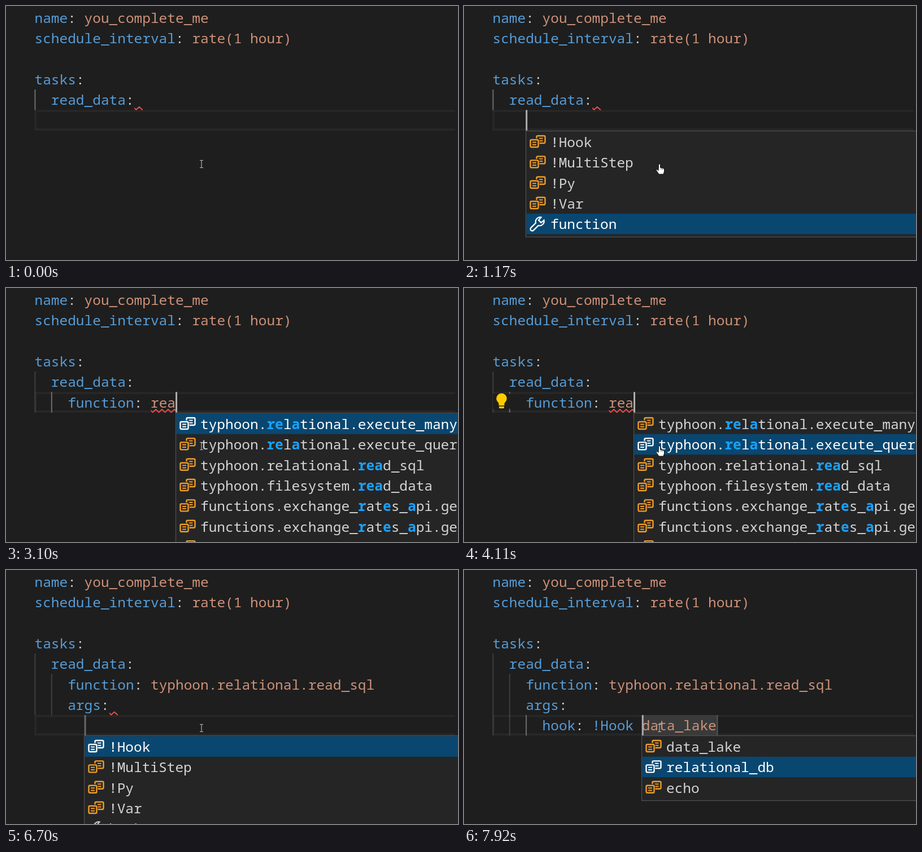
These frames come from a looping animation (800x450 px, 8000 ms). An HTML page with a canvas:

```html
<!DOCTYPE html>
<html lang="en">
<head>
<meta charset="utf-8">
<title>YAML completion</title>
<style>
html, body { margin: 0; width: 100%; height: 100%; overflow: hidden; background: #1e1e1e; }
canvas { display: block; }
</style>
</head>
<body>
<canvas id="stage" width="800" height="450"></canvas>
<script>
const ctx = document.getElementById('stage').getContext('2d');
const CHAR = 14.68, ROW = 36.35, LOOP = 8000, BASELINE = 27.3;
const FONT = '24.46px "Noto Sans Mono", "DejaVu Sans Mono", monospace';
const BLUE = '#569cd6', ORANGE = '#ce9178', GREY = '#d4d4d4', BG = '#1e1e1e', POPUP = '#252526';
const X = col => 51 + col * CHAR;
const Y = row => 2.5 + row * ROW;

const HEAD = ['name: you_complete_me', 'schedule_interval: rate(1 hour)', '', 'tasks:', '  read_data:'];
const READ = '    function: typhoon.relational.read_sql';

// "~" marks a property item, "*" encloses the matched letters
const KEYS = ['!Hook', '!MultiStep', '!Py', '!Var', '~function'];
const FUNCTIONS = [
  'typhoon.*re*l*a*tional.execute_many', 'typhoon.*re*l*a*tional.execute_query',
  'typhoon.relational.*rea*d_sql', 'typhoon.filesystem.*rea*d_data',
  'functions.exchange_*r*at*e*s_*a*pi.get', 'functions.exchange_*r*at*e*s_*a*pi.get_history',
  'typhoon.filesystem.*rea*d'
];
const ARGS = ['~*ar*gs', '!V*ar*'];
const VALUES = ['!Hook', '!MultiStep', '!Py', '!Var', '~hook', '~query'];
const HOOKS = ['data_lake', 'relational_db', 'echo'];

// Each step changes part of the editor state; guides are [column, first row, last row, active]
const STEPS = [
  [0, { lines: [], row: 5, col: 4, caret: 0, squiggle: [4, 12, 1], items: null, sel: 0,
        hand: false, bulb: false, selection: false, guides: [[0, 4, 4, 1]] }],
  [60, { caret: 1 }],
  [170, { items: KEYS }],
  [280, { hand: true }],
  [620, { sel: 1 }],
  [840, { sel: 2 }],
  [950, { sel: 3 }],
  [1170, { sel: 4 }],
  [1400, { lines: ['    function:'], col: 13, items: null, hand: false, guides: [[0, 4, 5], [2, 5, 5, 1]] }],
  [1510, { squiggle: null }],
  [1730, { squiggle: [5, 13, 1] }],
  [1840, { bulb: true }],
  [2180, { lines: ['    function: '], col: 14, bulb: false }],
  [2300, { squiggle: [5, 14, 1] }],
  [2640, { lines: ['    function: r'], col: 15 }],
  [2750, { lines: ['    function: re'], col: 16, squiggle: [5, 14, 2] }],
  [2970, { lines: ['    function: rea'], col: 17, squiggle: [5, 14, 3] }],
  [3080, { items: FUNCTIONS, sel: 0 }],
  [3190, { hand: true }],
  [3560, { bulb: true }],
  [4000, { sel: 1 }],
  [4220, { sel: 2 }],
  [4330, { lines: [READ], col: 41, items: null, hand: false, bulb: false }],
  [4450, { squiggle: null }],
  [4670, { row: 6, col: 4 }],
  [5110, { lines: [READ, '    a'], col: 5, guides: [[0, 4, 6], [2, 5, 6, 1]] }],
  [5330, { lines: [READ, '    ar'], col: 6 }],
  [5600, { squiggle: [6, 4, 2], items: ARGS, sel: 0 }],
  [5710, { hand: true }],
  [5930, { lines: [READ, '    args:'], row: 7, col: 6, items: null, hand: false, squiggle: null,
           guides: [[0, 4, 6], [2, 5, 6]] }],
  [6150, { squiggle: [6, 9, 1] }],
  [6260, { caret: 0 }],
  [6480, { caret: 1 }],
  [6590, { items: VALUES }],
  [6700, { caret: 0.5 }],
  [6810, { caret: 1, sel: 1 }],
  [6920, { sel: 2 }],
  [7030, { sel: 3 }],
  [7130, { sel: 4 }],
  [7360, { lines: [READ, '    args:', '      hook: !Hook data_lake'], col: 18, items: null, squiggle: null,
           selection: true, guides: [[0, 4, 7], [2, 5, 7], [4, 7, 7, 1]] }],
  [7470, { items: HOOKS, sel: 0 }],
  [7800, { sel: 1 }]
];

function rect(x, y, w, h, color) {
  ctx.fillStyle = color;
  ctx.fillRect(x, y, w, h);
}

function path(d, fill, stroke, width = 2) {
  const p = new Path2D(d);
  if (fill) { ctx.fillStyle = fill; ctx.fill(p); }
  if (stroke) { ctx.strokeStyle = stroke; ctx.lineWidth = width; ctx.stroke(p); }
}

function at(x, y, paint) {
  ctx.save();
  ctx.translate(x, y);
  paint();
  ctx.restore();
}

// Draws [text, color, bold] runs on the character grid
function runs(list, x, y) {
  for (const [text, color, bold] of list) {
    ctx.font = (bold ? 'bold ' : '') + FONT;
    ctx.fillStyle = color;
    ctx.fillText(text, x, y);
    x += text.length * CHAR;
  }
}

function codeLine(line, row) {
  const [, key, colon, tag, rest] = line.match(/^(?:(\s*\w+)(:))?(\s*!\w+)?(.*)$/);
  runs([[key || '', BLUE], [colon || '', GREY], [tag || '', BLUE], [rest, ORANGE]], X(0) - 0.5, Y(row) + BASELINE);
}

function squiggle([row, col, len]) {
  const x = X(col), y = Y(row + 1) - 3, w = len * CHAR, period = 10.9;
  ctx.save();
  ctx.beginPath();
  ctx.rect(x, y - 4, w, 8);
  ctx.clip();
  ctx.beginPath();
  for (let i = -1; i * period < w + period; i++) {
    ctx.lineTo(x + (i + 0.29) * period, y + 2.5);
    ctx.lineTo(x + (i + 0.79) * period, y - 2.5);
  }
  ctx.strokeStyle = '#f14c4c';
  ctx.lineWidth = 1.9;
  ctx.stroke();
  ctx.restore();
}

function enumIcon(color, back) {
  path('M14 -10.5h11q2 0 2 2v9q0 2 -2 2h-11q-2 0 -2 -2v-9q0 -2 2 -2z', null, color, 2.4);
  path('M16 -6h7M16 -1.8h7', null, color);
  rect(-1, -6, 18, 18, back);
  path('M3 -3.5h10q2 0 2 2v9q0 2 -2 2h-10q-2 0 -2 -2v-9q0 -2 2 -2z', null, color, 2.4);
  path('M4.5 1h7M4.5 5.2h7', null, color);
}

function wrenchIcon(color) {
  path('M20 -11.5a8 8 0 0 0 -9.5 10l-8.5 8.5a3 3 0 0 0 4.5 4.5l8.5 -8.5a8 8 0 0 0 10 -9.5l-5 4.5l-4.5 -4.5z', null, color, 2.2);
}

function popup({ row, col, items, sel }) {
  const x = Math.round(X(col)) - 0.5, y = Math.round(Y(row + 1)) + 0.5, h = items.length * ROW + 6;
  rect(x, y, 900, h, POPUP);
  items.forEach((item, i) => {
    const top = y + 1 + i * ROW, on = i === sel, back = on ? '#094771' : POPUP;
    if (on) rect(x + 1, top, 900, ROW, back);
    const property = item[0] === '~';
    at(x + 7, top + 18, () => property
      ? wrenchIcon(on ? '#fff' : '#c5c5c5')
      : enumIcon(on ? '#fff' : '#ee9d28', back));
    const parts = item.replace('~', '').split('*');
    runs(parts.map((s, k) => [s, k % 2 ? '#18a3ff' : on ? '#fff' : GREY, k % 2]), x + 43.5, top + BASELINE);
  });
  ctx.strokeStyle = '#505050';
  ctx.lineWidth = 1.2;
  ctx.strokeRect(x, y, 900, h);
}

function bulb(row) {
  rect(51, Y(row) + 3, 31, 27, BG);
  at(66.5, Y(row) + 12, () => {
    path('M-5 12V8C-7 5 -9.3 3 -9.3 -0.5A9.3 9.3 0 0 1 9.3 -0.5C9.3 3 7 5 5 8V12z', '#fc0');
    path('M-4.5 13.5h9v2q0 1.5 -2 1.5h-5q-2 0 -2 -1.5z', '#fc0');
  });
}

function mouse(hand) {
  at(346, 280, () => {
    if (hand) {
      path('M-1.5 1.5q0 -1.8 1.5 -1.8t1.5 1.8v5l5 1q2 .5 2 2.5v3l-1.5 5h-8l-4.5 -6.5q-1 -2 1 -2l2.5 2z', '#fff', '#111', 1);
      path('M2.8 10v-2M5.3 10.5v-2', null, '#333', 0.8);
    } else {
      path('M-3 -6.5h2.2l.8 .8l.8 -.8h2.2M0 -6V6M-3 6.5h2.2l.8 -.8l.8 .8h2.2', null, '#c0c0c0', 1.1);
    }
  });
}

function draw(t) {
  const s = {};
  for (const [time, change] of STEPS) if (time <= t) Object.assign(s, change);

  rect(0, 0, 800, 450, BG);
  const top = Y(s.row);
  rect(50.5, top, 744.5, 3.6, '#282828');
  rect(50.5, top + ROW - 3.6, 744.5, 3.6, '#282828');
  rect(50.5, top, 3.6, ROW, '#282828');
  for (const [col, from, to, active] of s.guides) {
    rect(X(col) - 0.5, Y(from), 1.9, (to - from + 1) * ROW, active ? '#707070' : '#404040');
  }
  if (s.selection) {
    rect(X(18), top, 9 * CHAR, ROW, '#3a3a3a');
    rect(X(27), top, 2, ROW, '#585858');
  }
  [...HEAD, ...s.lines].forEach(codeLine);
  if (s.squiggle) squiggle(s.squiggle);
  if (s.bulb) bulb(s.row);
  ctx.globalAlpha = s.caret;
  rect(X(s.col) - 0.5, top, 3, ROW, '#aeafad');
  ctx.globalAlpha = 1;
  if (s.items) popup(s);
  mouse(s.hand);
}

function frame() {
  draw(performance.now() % LOOP);
  requestAnimationFrame(frame);
}
frame();
</script>
</body>
</html>
```
